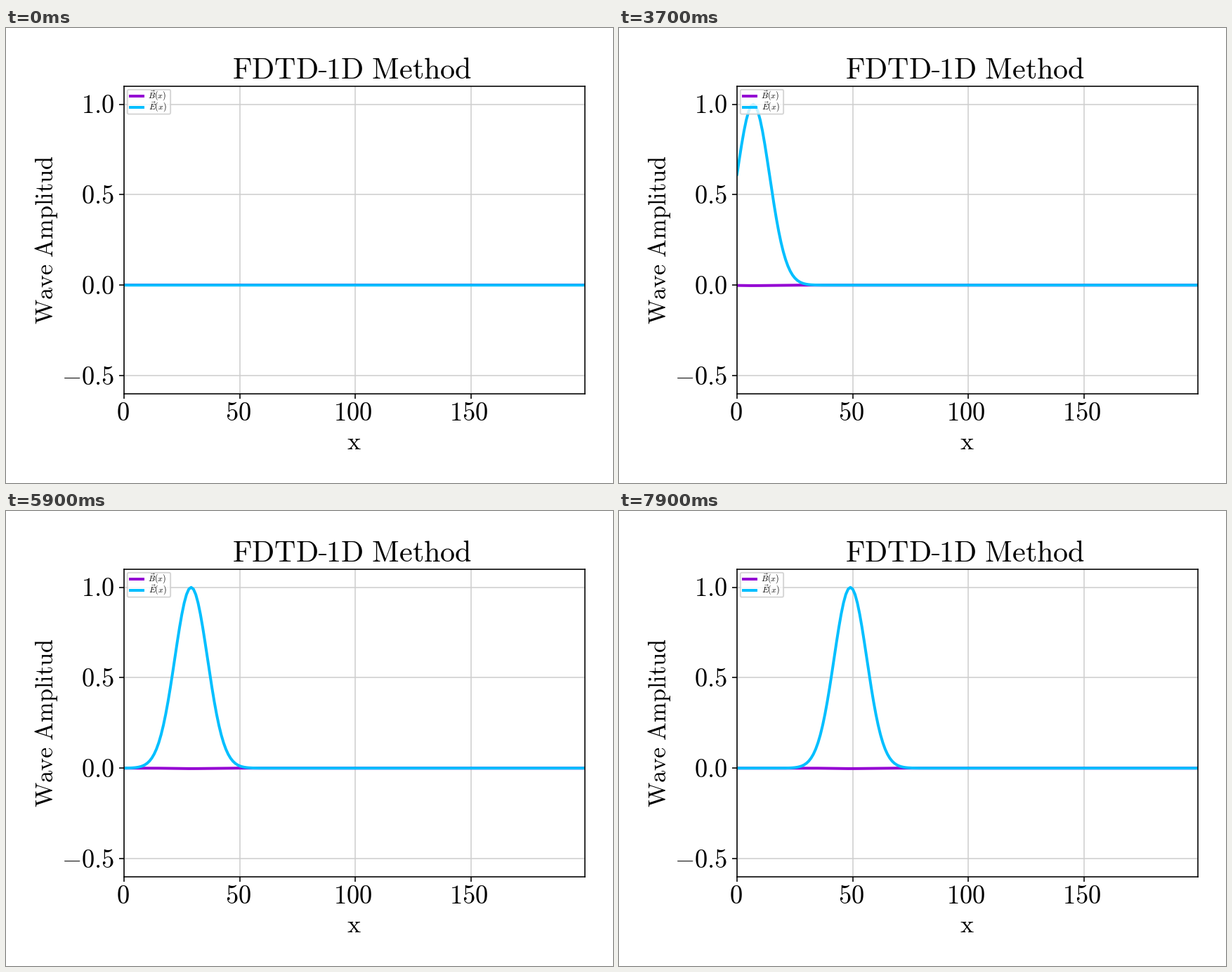
These frames come from a looping animation (864 by 648 pixels, 8 s). A matplotlib script:

```python
import numpy as np
import matplotlib.pyplot as plt
from matplotlib.animation import FuncAnimation
from matplotlib.lines import Line2D
from matplotlib.patches import FancyBboxPatch, Rectangle
from matplotlib.transforms import Affine2D

W, H, DPI = 864, 648, 144
FRAMES, INTERVAL = 80, 100
LEFT, RIGHT, TOP, BOTTOM = 168, 823.5, 83, 520.7
VIOLET, SKY = "#9400d3", "#00bfff"
IMPEDANCE = 377
PULSE_DELAY, PULSE_WIDTH = 30, 10

plt.rcParams["mathtext.fontset"] = "cm"
fig = plt.figure(figsize=(W / DPI, H / DPI), dpi=DPI, facecolor="white")
pixels = Affine2D().scale(1 / W, -1 / H).translate(0, 1) + fig.transFigure


def math_text(x, y, tex, size, ha="center", **kwargs):
    """Place a formula with its baseline at stage pixel (x, y)."""
    fig.text(x, y, f"${tex}$", transform=pixels, fontsize=size, ha=ha,
             va="baseline", color="black", **kwargs)


def roman(words):
    return r"\mathrm{" + words.replace(" ", r"\ ") + "}"


ax = fig.add_axes([LEFT / W, 1 - BOTTOM / H, (RIGHT - LEFT) / W, (BOTTOM - TOP) / H])
ax.set(xlim=(0, 199), ylim=(-0.6, 1.1),
       xticks=[0, 50, 100, 150], yticks=[-0.5, 0, 0.5, 1])
ax.tick_params(labelbottom=False, labelleft=False)
ax.grid(color="#cfcfcf", linewidth=0.8)

# Tick labels
for value, x in ((0, 166.5), (50, 330.5), (100, 494), (150, 659)):
    math_text(x, 559, str(value), 18.3)
for value in (-0.5, 0, 0.5, 1):
    y = TOP + (1.1 - value) / 1.7 * (BOTTOM - TOP)
    math_text(154, y + 12.6, f"{value:.1f}", 18.3, ha="right")

# Title and axis labels; the hyphen is a rule because mathtext would set a minus
math_text(321.5, 71.8, roman("FDTD"), 21.1, ha="left")
fig.add_artist(Rectangle((444.5, 60.8), 11, 2.6, color="black", linewidth=0,
                         transform=pixels))
math_text(663, 71.8, roman("1D Method"), 21.1, ha="right")
math_text(495, 600, roman("x"), 18)
math_text(67, 301.5, roman("Wave Amplitud"), 17.2, rotation=90,
          rotation_mode="anchor")

# Legend
fig.add_artist(FancyBboxPatch((172.8, 87.8), 61.3, 34.8,
                              boxstyle="round,pad=0,rounding_size=2",
                              facecolor="white", edgecolor="0.8", alpha=0.8,
                              linewidth=1, transform=pixels, zorder=2))
for y, name, color in ((97.2, "B", VIOLET), (113.3, "E", SKY)):
    fig.add_artist(Line2D([174.5, 197], [y, y], color=color, linewidth=2,
                          solid_capstyle="butt", transform=pixels, zorder=3))
    math_text(215.5, y + 3.8, rf"\vec{{{name}}}(x)", 6, zorder=4)

cells = np.arange(200)
magnetic, = ax.plot(cells, 0 * cells, color=VIOLET, linewidth=2)
electric, = ax.plot(cells, 0 * cells, color=SKY, linewidth=2)


def update(step):
    """The pulse enters at x = 0 and travels one cell per step."""
    field = np.exp(-((cells - step + PULSE_DELAY) / PULSE_WIDTH) ** 2)
    field[cells > step] = 0
    electric.set_ydata(field)
    magnetic.set_ydata(-field / IMPEDANCE)
    return magnetic, electric


anim = FuncAnimation(fig, update, frames=FRAMES, interval=INTERVAL,
                     repeat=True, repeat_delay=0)
plt.show()
```
